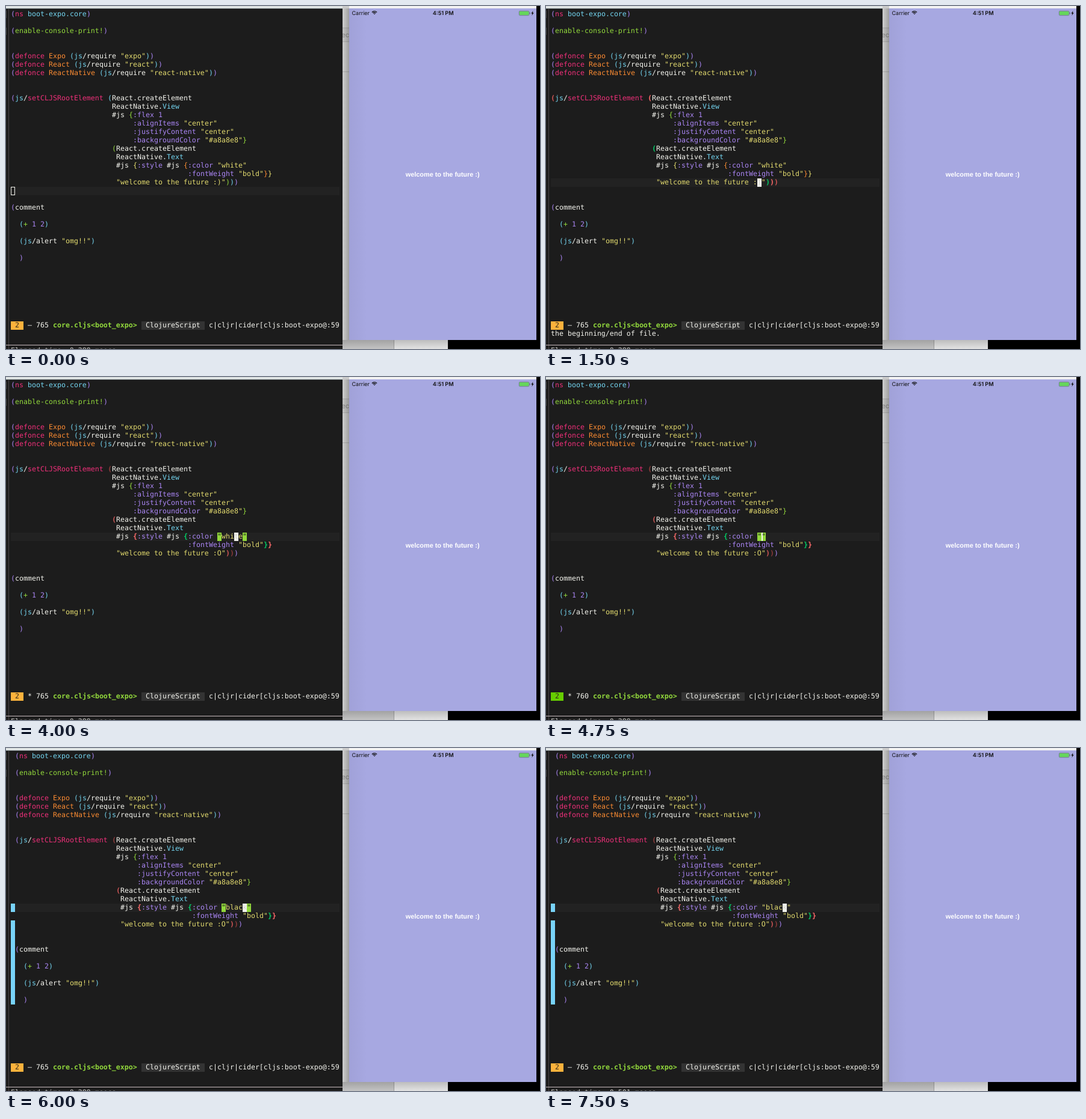
An HTML page with a canvas for the animation above (8 s loop, 887 by 571 pixels).

```html
<!DOCTYPE html>
<html lang="en">
<head>
<meta charset="utf-8">
<title>Live coding</title>
<style>
  html, body { margin: 0; width: 100%; height: 100%; overflow: hidden; background: #000; }
  canvas { display: block; }
</style>
</head>
<body>
<canvas id="stage" width="887" height="571"></canvas>
<script>
const ctx = document.getElementById('stage').getContext('2d');
const LOOP = 8000, LEFT = 8, TOP = 7, CW = 7, RH = 14;
const MONO = '11.627px "DejaVu Sans Mono", monospace';
const SANS = '"Liberation Sans", sans-serif', UI = 'Inter, sans-serif';
const BG = '#1c1c1c', WHITE = '#f4f4ee', PINK = '#f0307a', GREEN = '#92d83c', CYAN = '#74d5f0',
      ORANGE = '#fb8b32', PURPLE = '#ab86f5', YELLOW = '#e2da6e';
const RAINBOW = [PURPLE, CYAN, GREEN, YELLOW, ORANGE];
const ENCLOSING = ['#00cd66', '#ff6a6a', '#cd5555', '#8b3a3a'];

// Unhinted glyphs keep the 7px column advance exact.
ctx.textRendering = 'geometricPrecision';

// Editor states; each entry changes part of the previous one.
const timeline = [
  [0, { row: 21, col: 0, cursor: 'hollow', point: null, match: [], smile: ':)', color: 'white',
        echo: '', flag: '–', insert: false, gutter: 0, elapsed: '0.289' }],
  [500, { cursor: 'block' }],
  [1250, { row: 20, col: 49 }],
  [1500, { point: [20, 49], echo: 'the beginning/end of file.' }],
  [2250, { cursor: 'under', echo: '' }],
  [2500, { echo: 'the beginning/end of file.' }],
  [2750, { cursor: 'block', smile: ':O', flag: '*', echo: '' }],
  [3250, { row: 18 }],
  [3500, { point: [18, 49] }],
  [3750, { col: 55, match: [49] }],
  [4000, { col: 53, match: [49, 55] }],
  [4250, { col: 50, match: [] }],
  [4750, { cursor: 'bar', insert: true, color: '', match: [49, 50] }],
  [5000, { col: 54, color: 'blac', match: [49, 54] }],
  [5250, { col: 55, color: 'black', match: [49, 55] }],
  [5500, { col: 54, cursor: 'block', insert: false }],
  [6000, { flag: '–', gutter: 1 }],
  [6250, { match: [] }],
  [6750, { elapsed: '' }],
  [7000, { elapsed: '0.501' }],
];
const stateAt = t => Object.assign({}, ...timeline.filter(([at]) => at <= t).map(([, s]) => s));

const pad = (n, text) => ' '.repeat(n) + text;
const codeLines = s => [
  '(ns boot-expo.core)', '', '(enable-console-print!)', '', '',
  '(defonce Expo (js/require "expo"))',
  '(defonce React (js/require "react"))',
  '(defonce ReactNative (js/require "react-native"))', '', '',
  '(js/setCLJSRootElement (React.createElement',
  pad(24, 'ReactNative.View'),
  pad(24, '#js {:flex 1'),
  pad(29, ':alignItems "center"'),
  pad(29, ':justifyContent "center"'),
  pad(29, ':backgroundColor "#a8a8e8"}'),
  pad(24, '(React.createElement'),
  pad(25, 'ReactNative.Text'),
  pad(25, `#js {:style #js {:color "${s.color}"`),
  pad(42, ':fontWeight "bold"}}'),
  pad(25, `"welcome to the future ${s.smile}")))`), '', '',
  '(comment', '', '  (+ 1 2)', '', '  (js/alert "omg!!")', '', '  )',
];

const rules = [
  [YELLOW, '"[^"]*"'],
  [WHITE, '#js'],
  [PURPLE, ':[a-zA-Z]+|\\d+'],
  [PINK, '(?<=\\()(?:ns|defonce)|setCLJSRootElement'],
  [ORANGE, '(?<=defonce )\\w+'],
  [CYAN, '(?<=ns )[\\w.-]+|js(?=/)|(?<=Native\\.)\\w+'],
  [GREEN, 'enable-console-print!|\\+'],
  [WHITE, '[^\\s]'],
];
const tokenRegex = new RegExp(rules.map(([, r]) => `(${r})`).join('|'), 'g');

function tokenize(lines) {
  const tokens = [], open = [];
  lines.forEach((line, row) => {
    for (const m of line.matchAll(tokenRegex)) {
      const rule = m.slice(1).findIndex(g => g !== undefined);
      const token = { text: m[0], row, col: m.index, color: rules[rule][0] };
      if ('({'.includes(token.text)) {
        token.color = RAINBOW[open.length];
        open.push(token);
      } else if (')}'.includes(token.text)) {
        token.opener = open.pop();
        token.color = token.opener.color;
      }
      tokens.push(token);
    }
  });
  return tokens;
}

// Closers arrive innermost first, so the colours follow nesting outwards.
function markEnclosing(tokens, [row, col]) {
  const order = (r, c) => r * 1000 + c, here = order(row, col);
  tokens.filter(t => t.opener && order(t.row, t.col) > here && order(t.opener.row, t.opener.col) < here)
    .slice(0, ENCLOSING.length)
    .forEach((t, i) => {
      t.color = t.opener.color = ENCLOSING[i];
      t.bold = t.opener.bold = true;
    });
}

function rect(x, y, w, h, color) {
  ctx.fillStyle = color;
  ctx.fillRect(x, y, w, h);
}
function label(text, x, y, color, font) {
  ctx.font = font;
  ctx.fillStyle = color;
  ctx.fillText(text, x, y);
}
const rowY = row => TOP + row * RH;
const write = (text, row, col, color, bold) =>
  label(text, LEFT + col * CW, rowY(row) + 10, color, (bold ? 'bold ' : '') + MONO);
const cells = (row, col, n, color) => rect(LEFT + col * CW, rowY(row), n * CW, RH, color);

function fade(x, y, w, h, horizontal, from, to) {
  const g = ctx.createLinearGradient(x, y, horizontal ? x + w : x, horizontal ? y : y + h);
  g.addColorStop(0, from);
  g.addColorStop(1, to);
  rect(x, y, w, h, g);
}

function drawCursor(s, lines) {
  const col = s.col + s.gutter, x = LEFT + col * CW, y = rowY(s.row);
  if (s.cursor === 'hollow') {
    ctx.strokeStyle = WHITE;
    ctx.lineWidth = 1;
    ctx.strokeRect(x + .5, y + .5, CW - 1, RH - 1);
  } else if (s.cursor === 'under') {
    rect(x, y + RH - 2, CW, 2, WHITE);
  } else if (s.cursor === 'bar') {
    rect(x, y, 2, RH, WHITE);
  } else {
    cells(s.row, col, 1, WHITE);
    write(lines[s.row][s.col] || '', s.row, col, '#d4d4cc');
  }
}

function drawEditor(s) {
  rect(0, 0, 559, 571, BG);
  rect(0, 0, 559, 4, '#dde2e2');
  rect(0, 4, 559, 1, '#4a5254');
  rect(4, 5, 1, 566, '#4b4648');
  rect(0, 8, 1, 12, '#3c3c3c');
  rect(0, 36, 1, 12, '#3c3c3c');

  const lines = codeLines(s), tokens = tokenize(lines), g = s.gutter;
  if (s.point) markEnclosing(tokens, s.point);
  cells(s.row, g, 78 - g, '#222');
  if (g) {
    cells(18, 0, 1, '#78d3f8');
    rect(LEFT, rowY(20), CW, 10 * RH, '#78d3f8');
  }
  for (const t of tokens) write(t.text, t.row, t.col + g, t.color, t.bold);
  for (const col of s.match) {
    cells(18, col + g, 1, GREEN);
    write('"', 18, col + g, BG);
  }
  drawCursor(s, lines);

  cells(37, 0, 3, s.insert ? '#66cd00' : '#fcb23c');
  write('2', 37, 1, '#332b1c');
  write(`${s.flag} ${760 + s.color.length}`, 37, 4, WHITE);
  write('core.cljs<boot_expo>', 37, 10, GREEN, true);
  cells(37, 31, 15, '#333');
  write('ClojureScript', 37, 32, WHITE);
  write('c|cljr|cider[cljs:boot-expo@:59', 37, 47, WHITE);
  write(s.echo, 38, 0, WHITE);
  rect(0, 564, 559, 1, '#c8bcbe');
  if (s.elapsed) write(`Elapsed time: ${s.elapsed} msecs`, 40, 0, '#c8c8c4');
}

function drawBackdrop() {
  rect(559, 0, 328, 571, '#000');
  rect(559, 0, 86, 571, '#cbcbcb');
  rect(559, 36, 11, 24, '#c2c2c2');
  for (const y of [36, 59, 109]) rect(559, y, 11, 1, '#adadad');
  label('ec', 557.5, 52, '#858585', `11.5px ${SANS}`);
  fade(560, 4, 10, 552, true, 'rgba(0,0,0,0)', 'rgba(0,0,0,.22)');
  rect(645, 556, 89, 15, '#ececec');
  rect(644, 556, 1, 15, '#a5a5a5');
  fade(559, 556, 175, 15, false, 'rgba(0,0,0,.2)', 'rgba(0,0,0,.04)');
}

function drawPhone() {
  rect(570, 0, 311, 4, '#f2f2f2');
  rect(570, 4, 311, 552, '#a7a8e1');
  fade(570, 4, 30, 552, true, 'rgba(0,0,0,.04)', 'rgba(0,0,0,0)');
  label('Carrier', 574.5, 15, '#111', `9px ${UI}`);
  label('4:51 PM', 708.7, 15, '#111', `600 9.1px ${UI}`);

  ctx.strokeStyle = '#111';
  ctx.lineWidth = 1.3;
  for (const r of [1, 3.3, 5.6]) {
    ctx.beginPath();
    ctx.arc(612, 14.3, r, -Math.PI * .76, -Math.PI * .24);
    ctx.stroke();
  }

  ctx.lineWidth = .7;
  ctx.strokeStyle = '#55705f';
  ctx.beginPath();
  ctx.roundRect(852.3, 8.3, 16.6, 7.4, 1.5);
  ctx.stroke();
  rect(853, 9, 15.2, 6, '#65d65c');
  rect(869.5, 10.5, 1, 3, '#55705f');
  ctx.fillStyle = '#111';
  ctx.fill(new Path2D('M875.5 8 L872.3 12.6 H874.2 L873.4 16 L876.7 11.3 H874.8 Z'));

  label('welcome to the future :)', 663.7, 284, '#fff', `bold 10.9px ${SANS}`);
}

function frame(now) {
  drawBackdrop();
  drawPhone();
  drawEditor(stateAt(now % LOOP));
  requestAnimationFrame(() => frame(performance.now()));
}
frame(performance.now());
</script>
</body>
</html>
```
